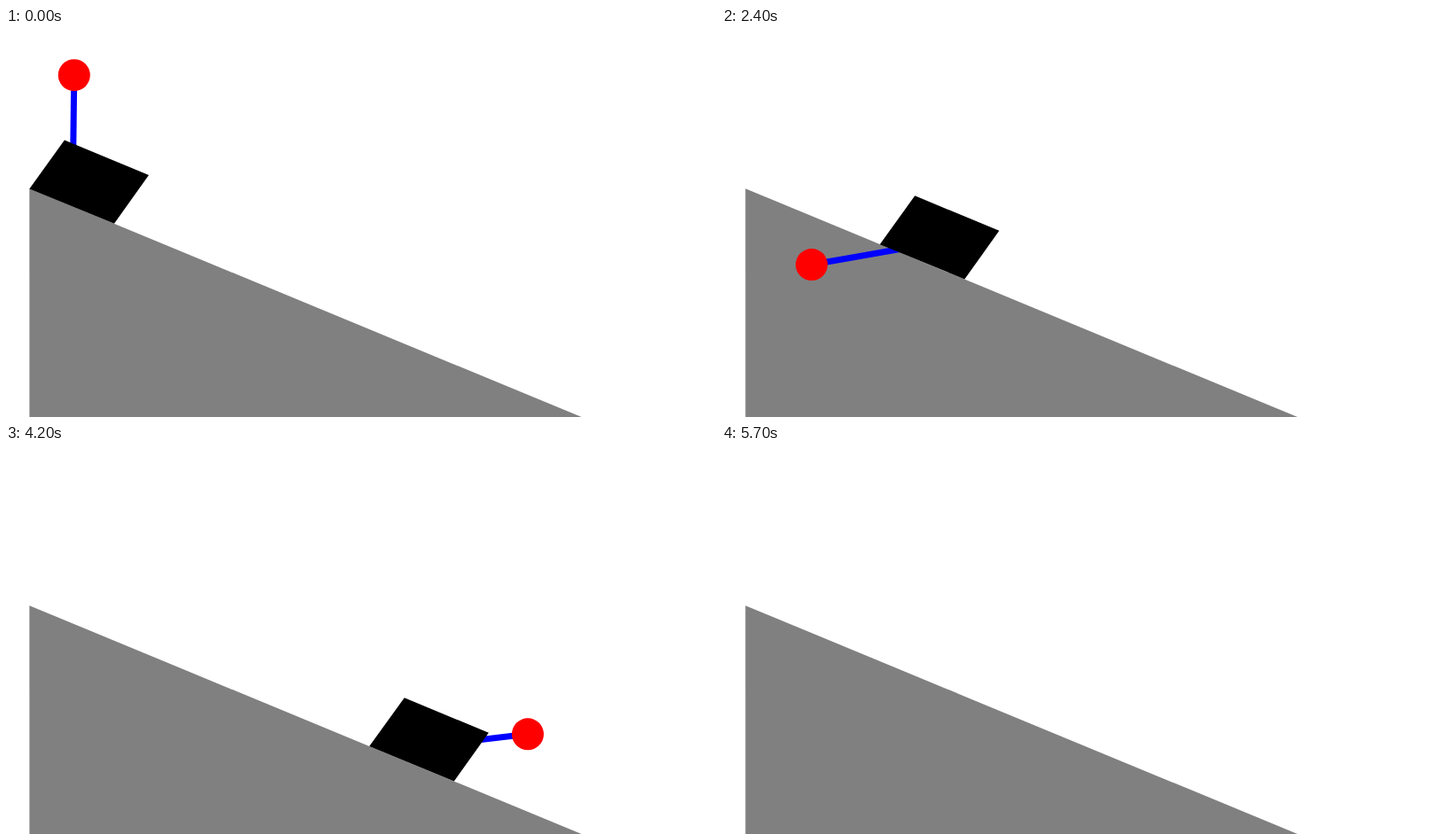
An HTML page that plays this animation: 800x439 px, repeating every 6600 ms.

```html
<!DOCTYPE html>
<html lang="en">
<head>
<meta charset="utf-8">
<title>Pendulum on a sliding block</title>
<style>
  html, body { margin: 0; width: 100%; height: 100%; overflow: hidden; background: #fff; }
  svg { display: block; width: 800px; height: 439px; }
</style>
</head>
<body>
<svg viewBox="0 0 800 439">
  <path d="M26.4 181.3L648.5 439H26.4Z" fill="#808080"/>
  <g id="slider">
    <line id="rod" stroke="#00f" stroke-width="7"/>
    <path id="block" d="M26.4 181.4L65.9 126.6L160.9 166.1L121.9 220.8Z"/>
    <circle id="ball" r="18" fill="#f00"/>
  </g>
</svg>
<script>
const LOOP = 6600, STEP = 100, GONE = 5700;  // ms
const LEAD = 10;                             // the pendulum runs this far ahead of the block, ms
const SLOPE = Math.PI / 8;
const GRAVITY = 134.7;                       // px/s²
const LENGTH = 128.5;                        // px
const COUPLING = LENGTH / 4;                 // the ball has a quarter of the total mass
const START = 0.7 * Math.PI / 180 - SLOPE;   // first angle, from the ramp's normal
const PIVOT = { x: 75.2, y: 181.7 };

const { sin, cos } = Math;
const slider = document.getElementById("slider");
const rod = document.getElementById("rod");
const block = document.getElementById("block");
const ball = document.getElementById("ball");

// Angle from the ramp's normal after ms: a pendulum on a free, frictionless cart
function swing(ms) {
  let angle = START, speed = 0;
  for (let i = 0; i < ms; i++) {
    const s = sin(angle), c = cos(angle);
    const force = GRAVITY * cos(SLOPE) * s - COUPLING * s * c * speed * speed;
    speed += force / (LENGTH - COUPLING * c * c) / 1000;
    angle += speed / 1000;
  }
  return angle;
}

// The common centre of mass falls evenly along the ramp; the block yields to the ball
function stateAt(ms) {
  const angle = swing(ms), t = ms / 1000;
  const fall = GRAVITY * sin(SLOPE) * t * t / 2;
  const slide = fall - COUPLING * (sin(angle) - sin(START));
  return { tilt: angle + SLOPE, x: slide * cos(SLOPE), y: slide * sin(SLOPE) };
}

function set(element, attributes) {
  for (const name in attributes) element.setAttribute(name, attributes[name]);
}

function draw(ms) {
  slider.style.display = ms < GONE ? "" : "none";
  if (ms >= GONE) return;
  const base = stateAt(ms), arm = stateAt(ms + LEAD);
  const x1 = PIVOT.x + arm.x, y1 = PIVOT.y + arm.y;
  const x2 = x1 + LENGTH * sin(arm.tilt), y2 = y1 - LENGTH * cos(arm.tilt);
  set(block, { transform: `translate(${base.x} ${base.y})` });
  set(rod, { x1, y1, x2, y2 });
  set(ball, { cx: x2, cy: y2 });
}

const start = performance.now();
function tick() {
  const time = (performance.now() - start) % LOOP;
  draw(Math.floor(time / STEP) * STEP);
  requestAnimationFrame(tick);
}
tick();
</script>
</body>
</html>
```
